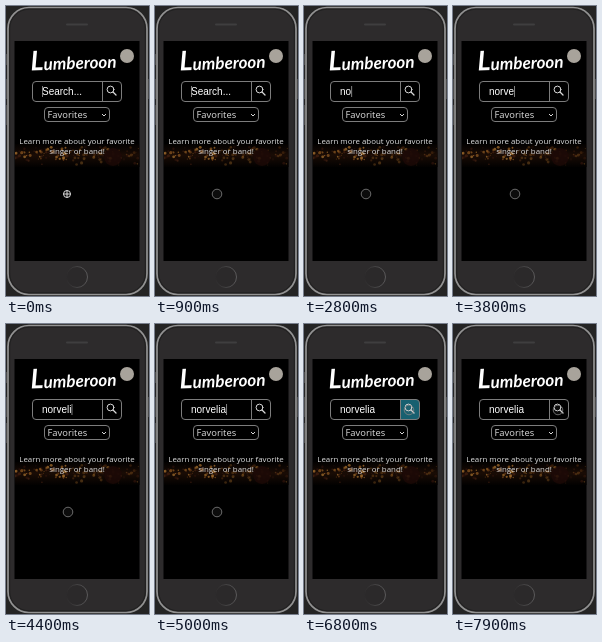
These frames come from a looping animation (143 by 290 pixels, 8 s). An HTML page:

```html
<!DOCTYPE html>
<html lang="en">
<head>
<meta charset="utf-8">
<title>Music search on a phone</title>
<style>
  html, body { margin: 0; width: 100%; height: 100%; overflow: hidden; background: #242424; }
  svg { display: block; width: 143px; height: 290px; }
  .line { fill: none; stroke: #7c7c7c; stroke-width: 1; }
  .icon { fill: none; stroke: #d8d8d8; stroke-width: 1; }
  .sans { font-family: "Open Sans", "Noto Sans", sans-serif; fill: #dedede; }
  .field { font: 10px "Liberation Sans", Arial, sans-serif; fill: #fff; }
  .brand { font: italic 700 17px Lato, sans-serif; fill: #fff; }
</style>
</head>
<body>
<svg viewBox="0 0 143 290">
  <defs>
    <linearGradient id="glow" x2="0" y2="1">
      <stop offset="0" stop-color="#140904" stop-opacity="0"/>
      <stop offset=".5" stop-color="#1a0c05"/>
      <stop offset="1" stop-color="#000"/>
    </linearGradient>
    <linearGradient id="ring">
      <stop offset="0" stop-color="#2d2b2c"/>
      <stop offset="1" stop-color="#5a595a"/>
    </linearGradient>
    <clipPath id="strip"><rect x="9" y="138" width="124.5" height="23"/></clipPath>
  </defs>

  <!-- phone -->
  <path d="M.5 48v11M.5 73v20M.5 99v20M142.5 73v20" stroke="#4a4a4a"/>
  <rect x="2" y="1.5" width="139" height="287" rx="21" fill="#2d2b2c" stroke="#929292" stroke-width="1.7"/>
  <rect x="3.7" y="3.2" width="135.6" height="283.6" rx="19.5" fill="none" stroke="#202020"/>
  <rect x="60" y="17.5" width="22" height="2" rx="1" fill="#3f3e3f"/>
  <circle cx="71" cy="271" r="10.5" fill="#2b292a" stroke="url(#ring)"/>
  <rect x="8.5" y="35" width="125" height="220" fill="#000"/>

  <!-- stage lights -->
  <g clip-path="url(#strip)">
    <rect x="9" y="136" width="126" height="26" fill="url(#glow)"/>
    <g id="lights"></g>
    <circle cx="107" cy="151" r="9" fill="#1d0907" fill-opacity=".8"/>
  </g>

  <!-- heading -->
  <text class="brand" x="24.5" y="63" transform="rotate(-2 70 56)"><tspan font-size="27">L</tspan>umberoon</text>
  <circle cx="121" cy="50" r="7" fill="#a8a39b"/>

  <!-- search -->
  <path id="button" d="M97 75.5h15a3.5 3.5 0 0 1 3.5 3.5v13a3.5 3.5 0 0 1-3.5 3.5h-15z" fill="#000"/>
  <rect class="line" x="26.5" y="75.5" width="89" height="20" rx="3.5"/>
  <path class="line" d="M96.5 75.5v20"/>
  <g class="icon" stroke-linecap="round">
    <circle cx="104.5" cy="83.5" r="3.4"/>
    <path d="M107 86l3 3" stroke-width="1.3"/>
  </g>
  <text id="query" class="field" x="36" y="89"></text>
  <path id="caret" d="M36.5 80v11" stroke="#bbb" stroke-width=".7"/>

  <!-- list choice -->
  <rect class="line" x="38.5" y="101.5" width="65" height="14" rx="3.5"/>
  <text class="sans" x="41.5" y="112.3" font-size="9.4">Favorites</text>
  <path class="icon" d="M96 108l2 2 2-2"/>

  <g class="sans" font-size="7.9" text-anchor="middle">
    <text x="71" y="138">Learn more about your favorite</text>
    <text x="71" y="147.5">singer or band!</text>
  </g>

  <!-- pointer -->
  <g id="pointer">
    <circle id="touch" r="4.8" fill="#777" fill-opacity=".1" stroke="#858585" stroke-width=".8"/>
    <g id="cross" fill="none" stroke="#eee" stroke-width=".9">
      <circle r="3.5"/>
      <path d="M-3.5 0h7M0-3.5v7"/>
    </g>
  </g>
</svg>

<script>
const LOOP = 8000;
const WORD = "norvelia";
const KEYS = [2500, 2700, 3100, 3400, 3700, 4050, 4350, 4700];
const PRESS = 6200, RELEASE = 7300;
const PATH = [
  [5450, 62, 188], [5650, 92, 192], [5820, 131, 181],
  [6000, 121, 125], [6200, 105, 86]
];
const $ = id => document.getElementById(id);
const query = $("query"), caret = $("caret"), button = $("button");

function drawLights() {
  let seed = 19;
  const rand = () => (seed = seed * 16807 % 2147483647) / 2147483647;
  const tones = ["#6d3e16", "#8a5722", "#432010", "#a06c2c", "#2b120b"];
  let dots = "";
  for (let i = 0; i < 150; i++) {
    const x = 9 + rand() * 124;
    const y = 139 + (rand() + rand()) * 10;
    const r = 0.5 + rand() * 1.1;
    const fade = x < 62 ? 0.75 : 0.4;
    dots += `<circle cx="${x}" cy="${y}" r="${r}" opacity="${fade}" fill="${tones[i % 5]}"/>`;
  }
  $("lights").innerHTML = dots;
}

function place(t) {
  if (t <= PATH[0][0]) return PATH[0].slice(1);
  for (let i = 1; i < PATH.length; i++) {
    const [t0, x0, y0] = PATH[i - 1], [t1, x1, y1] = PATH[i];
    if (t < t1) {
      const k = (t - t0) / (t1 - t0);
      return [x0 + (x1 - x0) * k, y0 + (y1 - y0) * k];
    }
  }
  return PATH[PATH.length - 1].slice(1);
}

function caretOn(t) {
  if (t >= PRESS) return false;
  if (t < KEYS[0]) return (t + 100) % 1000 < 500;
  const last = KEYS[KEYS.length - 1];
  return t < last || (t - last) % 1000 < 500;
}

const show = (el, on) => el.setAttribute("visibility", on ? "visible" : "hidden");

function draw() {
  const t = performance.now() % LOOP;
  const typed = WORD.slice(0, KEYS.filter(k => k <= t).length);
  const text = typed || "Search...";
  if (query.textContent !== text) query.textContent = text;
  const dx = typed ? query.getComputedTextLength() : 0;
  caret.setAttribute("transform", `translate(${dx})`);
  show(caret, caretOn(t));

  button.setAttribute("fill", t >= PRESS && t < RELEASE ? "#176070" : "#000");
  const start = t < 300;
  const [x, y] = start ? [61, 188] : place(t);
  $("pointer").setAttribute("transform", `translate(${x} ${y})`);
  show($("cross"), start);
  show($("touch"), !start);
  requestAnimationFrame(draw);
}

drawLights();
draw();
</script>
</body>
</html>
```
